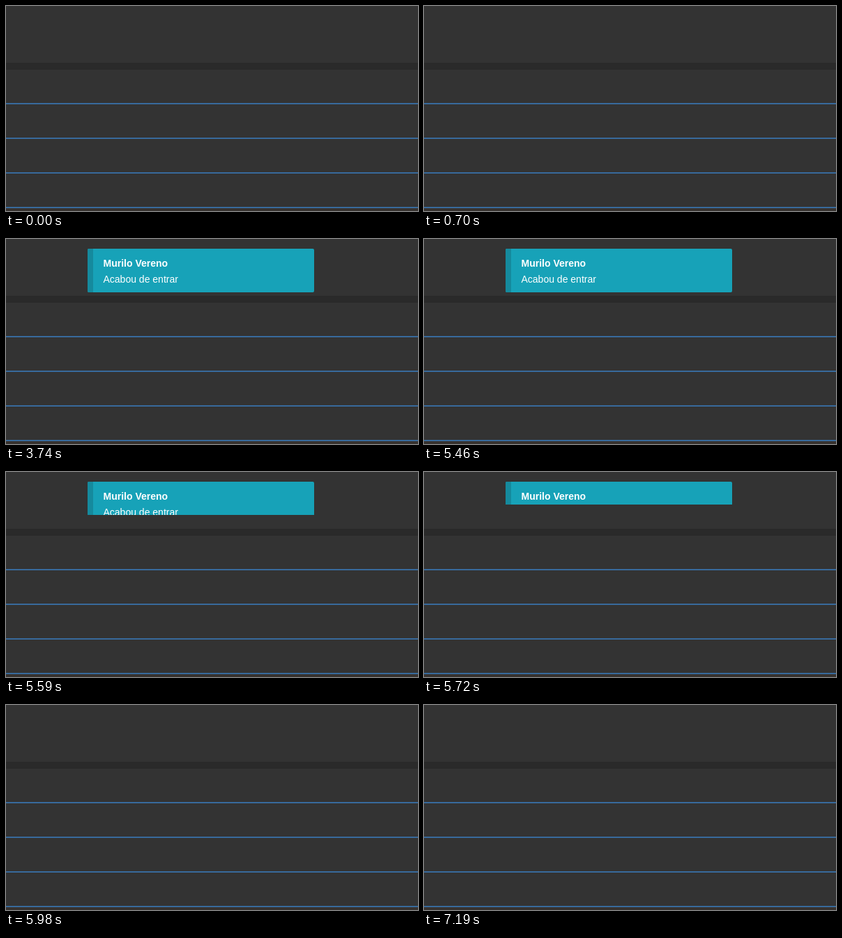
An HTML page for the animation above (8 s loop, 591x296 px).

```html
<!DOCTYPE html>
<html lang="pt-BR">
<head>
<meta charset="utf-8">
<title>Aviso de entrada</title>
<style>
  html, body { margin: 0; height: 100%; overflow: hidden; background: #333; }
  svg { display: block; }
  text { font: 14px "Liberation Sans", Arial, sans-serif; fill: #fff; }
  .name { font-weight: bold; }
</style>
</head>
<body>
<svg width="591" height="296">
  <rect y="82" width="591" height="10" fill="#2a2a2a"/>
  <path d="M0 141H591M0 191H591M0 241H591M0 291H591" stroke="#386a9c" stroke-width="2"/>
  <rect y="292" width="591" height="4" fill="#37322f"/>
  <!-- The nested svg clips the toast as its height shrinks -->
  <svg id="toast" x="117" y="14" width="325" height="0">
    <rect width="325" height="63" rx="2" fill="#17a2b8"/>
    <path d="M8 0V63H2Q0 63 0 61V2Q0 0 2 0Z" fill="#158a9d"/>
    <text class="name" x="22.5" y="26">Murilo Vereno</text>
    <text x="22.5" y="49">Acabou de entrar</text>
  </svg>
</svg>
<script>
const LOOP = 8000, SHOW = 1170, CLOSE = 5460, STEP = 130;
const closingHeights = [63, 48, 33, 15, 0];
const toast = document.getElementById('toast');

function toastHeight(t) {
  if (t < SHOW) return 0;
  if (t < CLOSE) return 63;
  return closingHeights[Math.min(4, Math.floor((t - CLOSE) / STEP))];
}

const start = performance.now();
function draw() {
  const height = toastHeight((performance.now() - start) % LOOP);
  toast.setAttribute('height', height);
  toast.style.display = height ? '' : 'none';
  requestAnimationFrame(draw);
}
draw();
</script>
</body>
</html>
```
